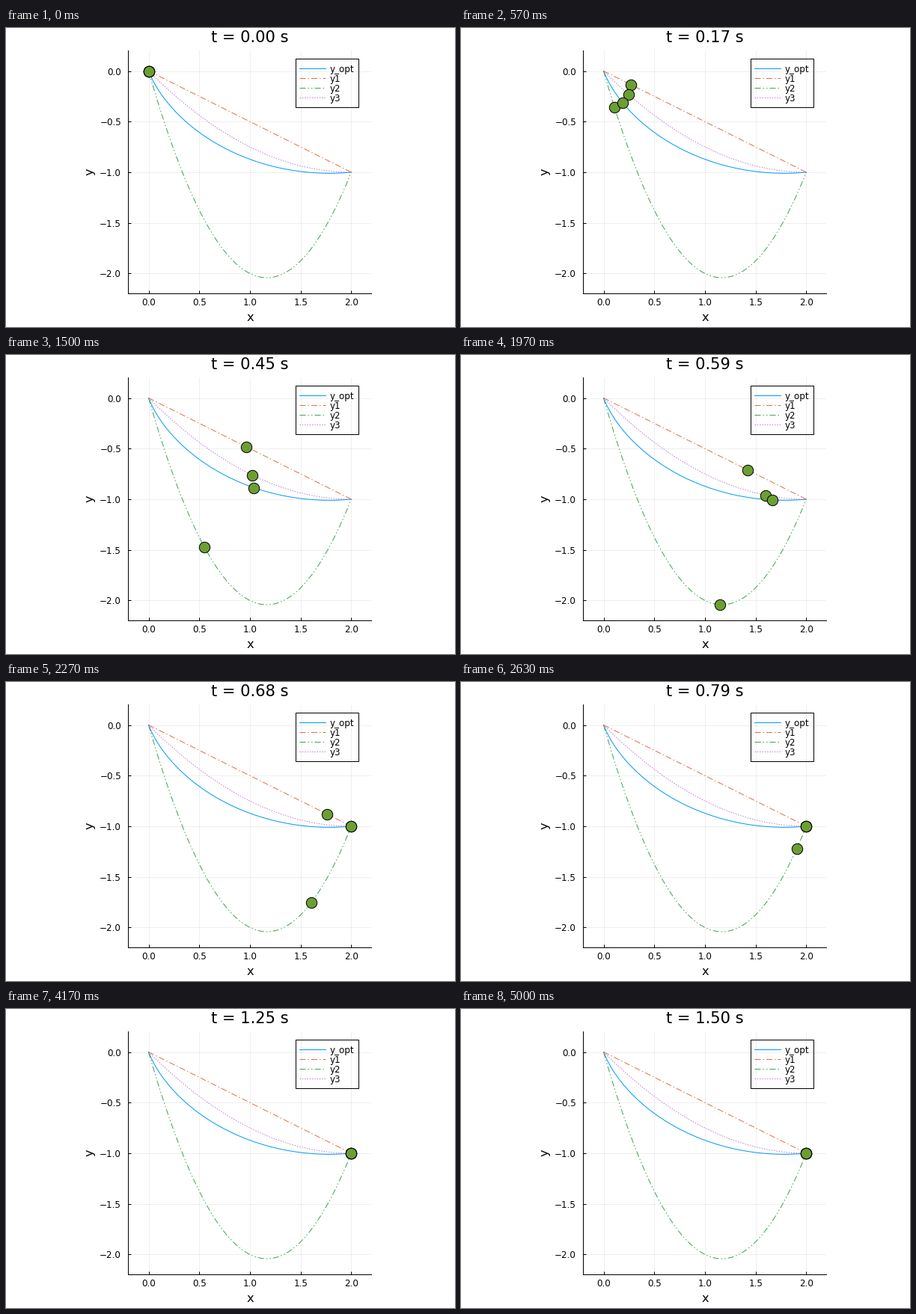
These frames come from a looping animation (600 by 400 pixels, 5.03 s). A matplotlib script:

```python
import numpy as np
import matplotlib.pyplot as plt
from matplotlib.animation import FuncAnimation

TICKS, TICK_MS = 503, 10     # the picture steps 30 times a second on a 10 ms clock
FPS, DT = 30, 0.01
G, HEAD = 9.81, 0.1          # gravity, starting head (initial speed)
ARC_TOP = 0.15               # level of the cycloid's cusp
PT = 72 / 100                # points per pixel
BLUE, ORANGE, GREEN, PURPLE, BEAD = "#009afa", "#e36f47", "#3ea44e", "#c371d2", "#6c9f33"

plt.rcParams["font.family"] = "DejaVu Sans"
plt.rcParams["lines.scale_dashes"] = False


def cycloid(r, n=501):
    """Arc from (0, 0) to y = -1 on the way up, rolling under ARC_TOP."""
    a = np.arccos(1 - ARC_TOP / r)
    b = 2 * np.pi - np.arccos(1 - (ARC_TOP + 1) / r)
    th = np.linspace(a, b, n)
    x = r * (th - np.sin(th))
    return x - x[0], ARC_TOP - r * (1 - np.cos(th))


def fastest():
    lo, hi = (ARC_TOP + 1) / 2 + 1e-6, 0.8
    for _ in range(50):
        r = (lo + hi) / 2
        lo, hi = (r, hi) if cycloid(r)[0][-1] < 2 else (lo, r)
    return cycloid(r)


def travel_time(x, y):
    """Time to reach each point from energy conservation."""
    v = np.sqrt(2 * G * (HEAD - y))
    step = 2 * np.hypot(np.diff(x), np.diff(y)) / (v[1:] + v[:-1])
    return np.concatenate([[0], np.cumsum(step)])


xs = np.linspace(0, 2, 501)
tracks = [
    ("y_opt", *fastest(), BLUE, ()),
    ("y1", xs, -xs / 2, ORANGE, (8, 3, 1.5, 3)),
    ("y2", xs, 1.5 * xs**2 - 3.5 * xs, GREEN, (8, 3, 1.5, 3, 1.5, 3)),
    ("y3", xs, xs**2 / 4 - xs, PURPLE, (1.4, 1.9)),
]
times = [travel_time(x, y) for _, x, y, _, _ in tracks]

fig = plt.figure(figsize=(6, 4), dpi=100, facecolor="white")
ax = fig.add_axes([163.48 / 600, 44.52 / 400, 325 / 600, 325 / 400])
ax.set(xlim=(-0.2, 2.2), ylim=(-2.2, 0.2))
ax.set_xticks(np.arange(0, 2.1, 0.5))
ax.set_yticks(np.arange(-2, 0.1, 0.5))
ax.tick_params(direction="in", length=4 * PT, width=1 * PT, labelsize=11.9 * PT)
ax.tick_params(axis="x", pad=6 * PT)
ax.tick_params(axis="y", pad=9.4 * PT)
ax.grid(color="black", alpha=0.1, lw=0.6 * PT)
ax.set_axisbelow(True)
ax.spines[["top", "right"]].set_visible(False)
ax.spines[["left", "bottom"]].set_linewidth(1 * PT)


def label(x, y, s, size, **kw):
    return fig.text(x / 600, 1 - y / 400, s, fontsize=size * PT, **kw)


def line_style(color, dash):
    ls = (0, tuple(d * PT for d in dash)) if dash else "-"
    return dict(color=color, lw=1 * PT, ls=ls, dash_capstyle="butt")


def stroke(xy, color, dash=()):
    x, y = np.array(xy).T
    fig.add_artist(plt.Line2D(x / 600, 1 - y / 400, transform=fig.transFigure,
                              zorder=5, **line_style(color, dash)))


label(326, 391.5, "x", 16.3, ha="center")
label(111.6, 192.6, "y", 16.3, ha="center", va="center", rotation=90)
title = label(274.5, 19, "", 21)

for i, (name, x, y, color, dash) in enumerate(tracks):
    ax.plot(x, y, **line_style(color, dash))
    row = 54.4 + 13 * i
    stroke([(392.4, row), (427.4, row)], color, dash)
    label(432.4, row + 4.9, name, 11.9)
left, right, top, bottom = 387.4, 471.4, 41.4, 106.4
stroke([(left, top), (right, top), (right, bottom), (left, bottom), (left, top)], "black")

# the fastest bead lies on top
beads = [ax.plot([], [], "o", ms=14.4 * PT, mfc=BEAD, mec="black", mew=1 * PT, zorder=z)[0]
         for z in (9, 6, 7, 8)]


def draw(k):
    step = int((k + 0.5) * TICK_MS * FPS / 1000)
    t = step * DT
    title.set_text(f"t = {t:.2f} s")
    for bead, clock, (_, x, y, _, _) in zip(beads, times, tracks):
        bead.set_data([np.interp(t, clock, x)], [np.interp(t, clock, y)])
    return [title, *beads]


anim = FuncAnimation(fig, draw, frames=TICKS, interval=TICK_MS, repeat=True,
                     repeat_delay=0, init_func=lambda: draw(0))
plt.show()
```
